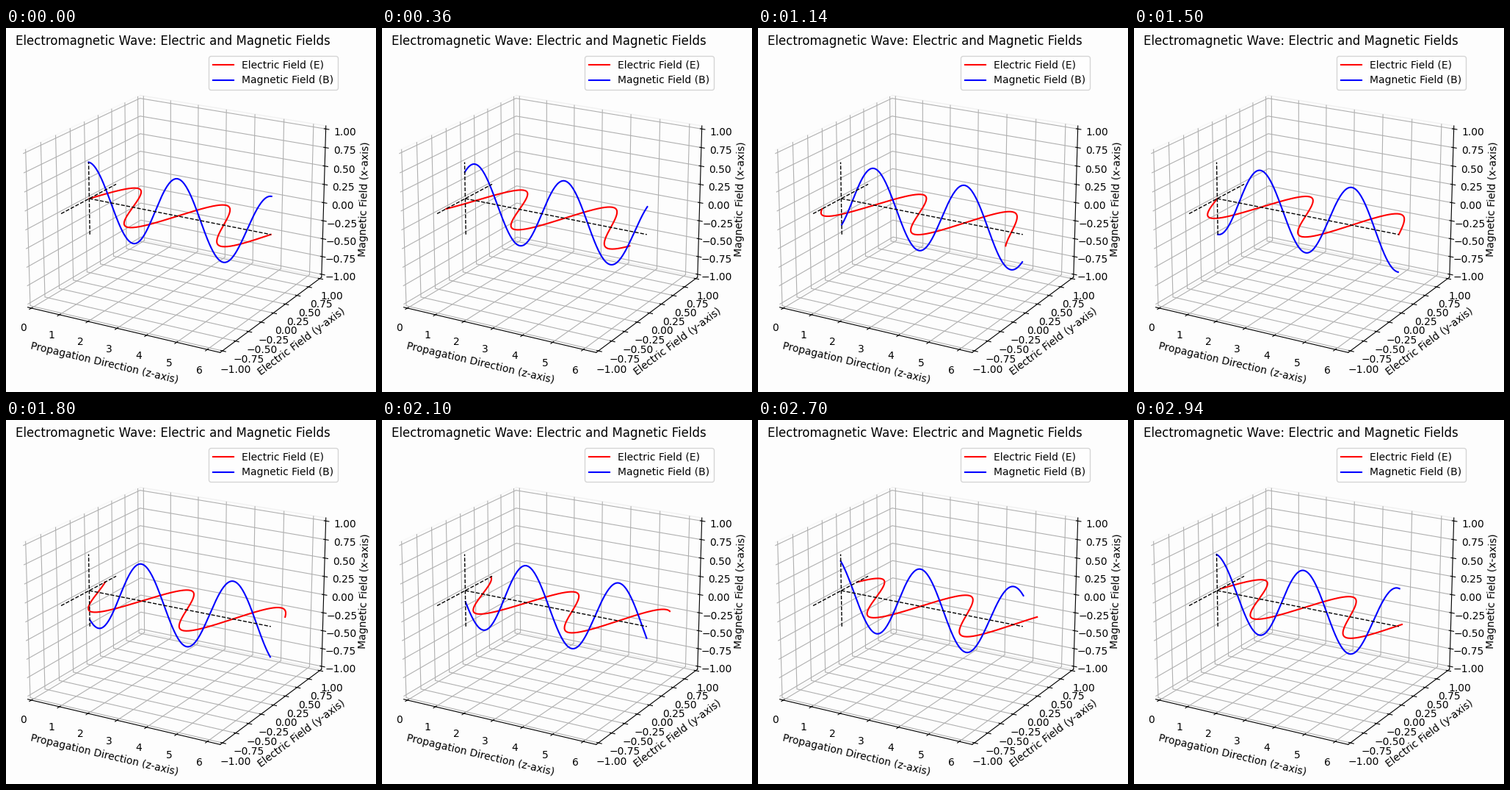
A matplotlib script that plays this animation: 504 by 495 pixels, repeating every 3000 ms.

```python
import numpy as np
import matplotlib.pyplot as plt
from matplotlib.animation import FuncAnimation

W, H, DPI = 504, 495, 100
FRAMES, INTERVAL = 50, 60
AMP, K = 0.5, 2
PAPER = "#fdfdfd"
MARGIN = 1 / 48

fig = plt.figure(figsize=(W / DPI, H / DPI), dpi=DPI, facecolor=PAPER)
ax = fig.add_axes([-5 / W, 2 / H, 465 / W, 462 / H], projection="3d",
                  facecolor=PAPER)
ax.view_init(elev=20, azim=-60)


def padded(lo, hi):
    pad = (hi - lo) * MARGIN
    return lo - pad, hi + pad


ax.set_xlim(*padded(0, 2 * np.pi))
ax.set_ylim(*padded(-1, 1))
ax.set_zlim(*padded(-1, 1))
for axis in (ax.xaxis, ax.yaxis, ax.zaxis):
    axis.pane.fill = False

ax.set_title("Electromagnetic Wave: Electric and Magnetic Fields")
ax.set_xlabel("Propagation Direction (z-axis)")
ax.set_ylabel("Electric Field (y-axis)")
ax.set_zlabel("Magnetic Field (x-axis)")

z = np.linspace(0, 2 * np.pi, 200)
zero = np.zeros_like(z)
e_line, = ax.plot([], [], [], color="red", label="Electric Field (E)")
b_line, = ax.plot([], [], [], color="blue", label="Magnetic Field (B)")

span = [-AMP, AMP]
guide = dict(color="black", linestyle="--", linewidth=1)
ax.plot(z, zero, zero, **guide)
ax.plot([0, 0], span, [0, 0], **guide)
ax.plot([0, 0], [0, 0], span, **guide)
ax.legend(loc="upper right")


def update(i):
    phase = K * z - 2 * np.pi * i / FRAMES
    e_line.set_data_3d(z, AMP * np.sin(phase), zero)
    b_line.set_data_3d(z, zero, AMP * np.cos(phase))
    return e_line, b_line


anim = FuncAnimation(fig, update, frames=FRAMES, interval=INTERVAL,
                     repeat=True, repeat_delay=0)
plt.show()
```
